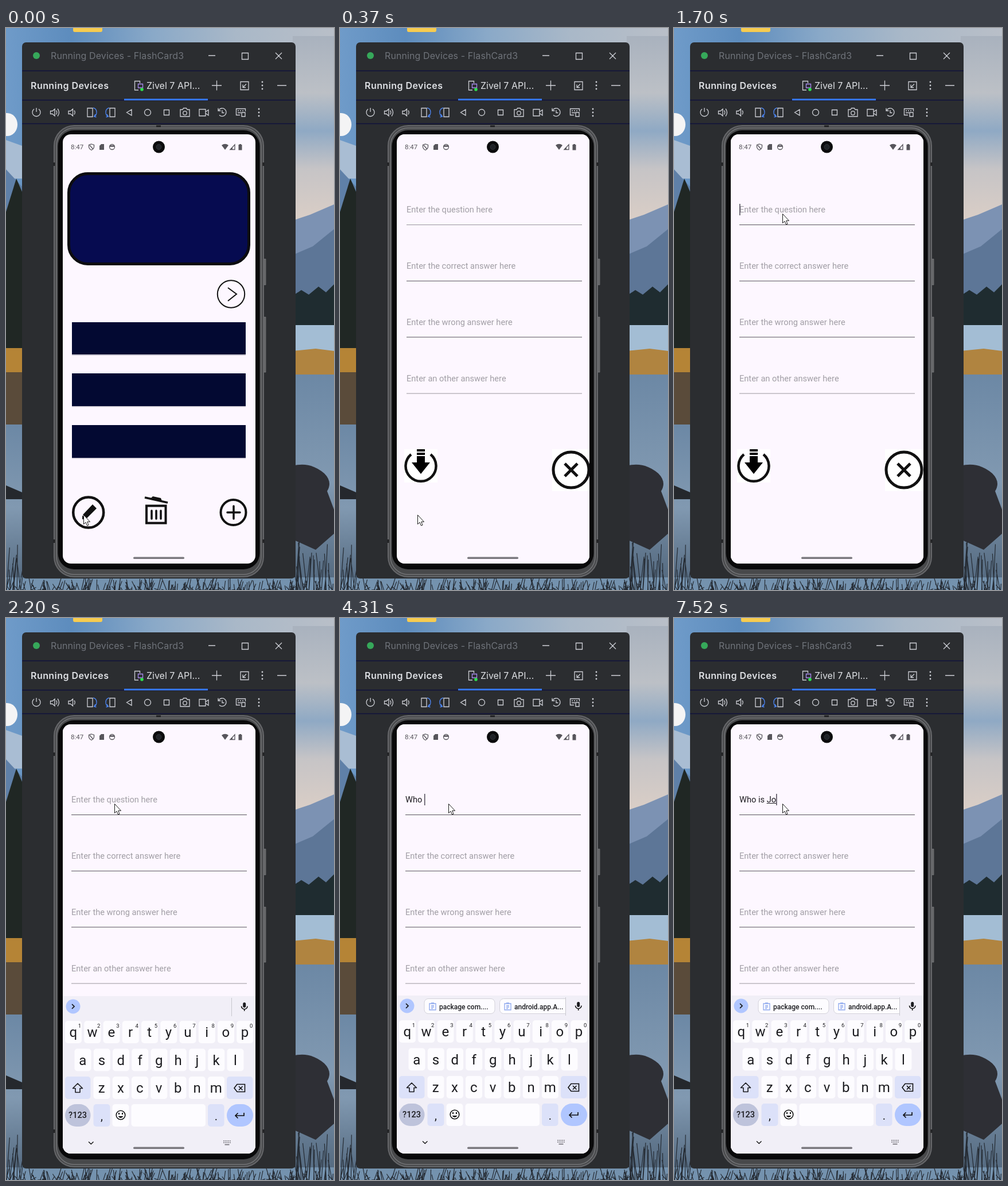
These frames come from a looping animation (572x978 px, 8 s). An HTML page:

```html
<!DOCTYPE html>
<html lang="en">
<head>
<meta charset="utf-8">
<title>Flash card form</title>
<style>
  html, body { margin: 0; height: 100%; overflow: hidden; background: #2b2d30; }
  svg { display: block; width: 100vw; height: 100vh; }
  text { white-space: pre; }
  .ui { font-family: Inter, sans-serif; font-size: 16px; fill: #dfe1e5; }
  .app { font-family: Roboto, sans-serif; }
  .field { font-size: 14.6px; fill: #a19ea5; }
  .line { fill: none; stroke: #ced0d6; stroke-width: 1.3; }
  .ink { fill: none; stroke: #111; }
  .mid { text-anchor: middle; }
</style>
</head>
<body>
<svg viewBox="0 0 572 978" preserveAspectRatio="none">
  <defs>
    <clipPath id="screen"><rect x="99" y="185" width="336" height="747" rx="14"/></clipPath>
    <clipPath id="chips"><rect x="140" y="655" width="253" height="40"/></clipPath>
    <linearGradient id="top">
      <stop offset="0" stop-color="#6f9bc9"/><stop offset=".2" stop-color="#5d8cbd"/>
      <stop offset=".45" stop-color="#8aa9c8"/><stop offset=".7" stop-color="#a9b8c8"/>
      <stop offset="1" stop-color="#b9bfc8"/>
    </linearGradient>
    <linearGradient id="sky" x2="0" y2="1">
      <stop offset="0" stop-color="#a9b2be"/><stop offset=".3" stop-color="#bcc0c6"/>
      <stop offset=".5" stop-color="#8fa9c4"/><stop offset=".7" stop-color="#c6c4c6"/>
      <stop offset="1" stop-color="#dccfc6"/>
    </linearGradient>
    <linearGradient id="water" x2="0" y2="1">
      <stop offset="0" stop-color="#6c88a5"/><stop offset=".5" stop-color="#8199b1"/>
      <stop offset="1" stop-color="#50657b"/>
    </linearGradient>
  </defs>

  <!-- landscape -->
  <rect width="572" height="978" fill="url(#top)"/>
  <g id="right">
    <rect x="500" y="14" width="72" height="330" fill="url(#sky)"/>
    <path d="M500 335L530 325L572 307V470H500Z" fill="#7c92b3"/>
    <path d="M500 395L535 380L572 350V470H500Z" fill="#5d7697"/>
    <path d="M500 466L515 456L528 464L545 450L558 460L572 446V518H500Z" fill="#1f2c30"/>
    <rect x="500" y="517" width="72" height="46" fill="#a3bdd4"/>
    <path d="M500 562L540 558L572 562V604H500Z" fill="#b08440"/>
    <rect x="500" y="603" width="72" height="375" fill="url(#water)"/>
    <path d="M500 762Q530 754 555 775Q570 790 560 806L572 838V880L540 908L500 890Z" fill="#2e2f35"/>
  </g>
  <g id="left">
    <ellipse cx="2" cy="168" rx="18" ry="20" fill="#f4f4f5"/>
    <path d="M0 195L28 205V262H0Z" fill="#a9bdd3"/>
    <path d="M0 246L28 276V350H0Z" fill="#5f80a8"/>
    <path d="M0 320L18 262L28 285V565H0Z" fill="#202724"/>
    <rect y="557" width="28" height="42" fill="#b58436"/>
    <rect y="599" width="28" height="95" fill="#5a4b3a"/>
    <rect y="690" width="28" height="288" fill="url(#water)"/>
    <path d="M0 796L28 808V820H0Z" fill="#25282d"/>
  </g>
  <rect y="956" width="572" height="22" fill="#7492ae"/>
  <path id="reeds" fill="none" stroke="#252b33" stroke-width="1.2"/>
  <path d="M117 0H168V4Q168 7 165 7H120Q117 7 117 4Z" fill="#f6cb50"/>

  <!-- window -->
  <rect x="28" y="25" width="477" height="933" rx="7" fill="#2b2d30"/>
  <path d="M28 74.5H505M28 125.5H505M28 166.5H505" stroke="#10113c" stroke-width="1.6"/>
  <circle cx="53" cy="48" r="6" fill="#36a85a"/>
  <g class="ui">
    <text x="78" y="54" letter-spacing=".1" fill="#6f737a" style="fill:#6f737a">Running Devices - FlashCard3</text>
    <text x="43" y="106" font-weight="600" letter-spacing=".45">Running Devices</text>
    <text x="245" y="106">Zivel 7 API...</text>
  </g>
  <rect x="206" y="123" width="146" height="3" fill="#3574f0"/>
  <g class="line">
    <path d="M353 48H365M411.500 43.500H422.500V54.500H411.500ZM470 43L481 54M481 43L470 54"/>
    <path d="M359 100H376M367.500 91.500V108.500M473 100H489"/>
    <path d="M409 93.500H423V107.500H409ZM419 97.500L413 103.500M413 98.500V103.500H418"/>
    <path d="M231 108H224.500V92.500H233.500V96" />
    <path d="M230.500 97.500H238.500V104H230.500Z" stroke="#a98bf0"/>
    <path d="M49 141A7 7 0 1 0 57 141M53 139V146"/>
    <path id="speaker" d="M77.500 144.500H81L85 141V153L81 149.500H77.500ZM87.500 143.500Q90 147 87.500 150.500"/>
    <path d="M90 140.500Q95 147 90 153.500"/>
    <use href="#speaker" x="31.500"/>
    <g id="turn"><path d="M142 139.500H151V154.500H142Z"/><path d="M152 139Q158 140 158 147Q158 152 154 154M156 150L153.500 154L157.500 155" stroke="#4d85f0"/></g>
    <use href="#turn" transform="matrix(-1 0 0 1 332 0)"/>
    <path d="M210.500 147L219 142V152ZM275.500 142.500H284.500V151.500H275.500Z"/>
    <circle cx="247" cy="147" r="5.500"/>
    <path d="M304 142H308L309.500 139.500H314.500L316 142H320V154H304Z"/><circle cx="312" cy="148" r="3.300"/>
    <path d="M337 141.500H348V153H337ZM348 146L353 142.500V152L348 148.500"/>
    <path d="M371 143A7 7 0 1 1 372 151.500M370 139.500V144H374.500M377 143V147.500H380.500"/>
    <path d="M408 151.500H401.500V140.500H417.500V145M404 144H406M408 144H410M412 144H414M404 147.500H410M411 147H417V154H411Z"/>
  </g>
  <circle cx="237" cy="107" r="2.800" fill="#2ee04c"/>
  <g fill="#ced0d6" id="dots"></g>

  <!-- phone body -->
  <path d="M450 402H453V447H450ZM450 503H453V599H450Z" fill="#606163" stroke="#8a8b8d" stroke-width=".6"/>
  <rect x="84" y="170" width="365" height="785" rx="35" fill="#48494b" stroke="#66676a" stroke-width="2"/>
  <rect x="88" y="174" width="357" height="777" rx="31" fill="none" stroke="#737477" stroke-width="1.500"/>
  <rect x="90.500" y="178" width="352" height="764" rx="28" fill="#09090a"/>
  <path d="M262 171H270M84 234V240M84 890V896M449 234V240M449 890V896" stroke="#222325" stroke-width="3"/>

  <g clip-path="url(#screen)" class="app">
    <rect x="99" y="185" width="336" height="747" fill="#fdf7ff"/>

    <g id="home">
      <rect x="109.500" y="253.500" width="314" height="157" rx="33" fill="#060b50" stroke="#0c0c10" stroke-width="5"/>
      <circle cx="392.500" cy="463" r="23.700" class="ink" stroke-width="2"/>
      <path d="M387 452L402 463L387 475" class="ink" stroke-width="2"/>
      <path d="M115 569H418M115 658.500H418M115 748.500H418" stroke="#c9c5cf" stroke-width="2"/>
      <path d="M115 512H418V568H115ZM115 601H418V658H115ZM115 691H418V748H115Z" fill="#030932"/>
      <circle cx="143.700" cy="843" r="26.500" class="ink" stroke-width="4.500"/>
      <path d="M134 847L151 829L158 836L141 853ZM133 848L139 854L133 855Z" fill="#111"/>
      <path d="M242 817L282 826" class="ink" stroke-width="3.500"/>
      <path d="M253 818L256 815L270 818L272 823Z" fill="#111"/>
      <path d="M245 831.500H278.500V861.500H245Z" class="ink" stroke-width="4"/>
      <path d="M254 840V854M262 840V854M270 840V854" class="ink" stroke-width="3.500" stroke-linecap="round"/>
      <circle cx="396.500" cy="843" r="22" class="ink" stroke-width="4"/>
      <path d="M386 843H408M397 832V854" class="ink" stroke-width="3.500" stroke-linecap="round"/>
    </g>

    <g id="form">
      <rect x="99" y="185" width="350" height="747" fill="#fdf7ff"/>
      <g class="field">
        <text id="hint" x="114" y="321">Enter the question here</text>
        <text x="114" y="419">Enter the correct answer here</text>
        <text x="114" y="517">Enter the wrong answer here</text>
        <text x="114" y="615">Enter an other answer here</text>
        <text id="typed" x="114" y="321" style="fill:#1d1b20"></text>
      </g>
      <path id="focusLine" d="M114 342.500H420"/>
      <path d="M114 440.300H420M114 538H420" stroke="#57555b" stroke-width="1.100"/>
      <path d="M114 636H420" stroke="#99969c"/>
      <rect id="under" y="322" height="1" fill="#1d1b20"/>
      <rect id="caret" y="306" width="1.600" height="20" fill="#57525f"/>
      <path d="M110 733H168V791H110ZM368 733H440V806H368Z" fill="#fff"/>
      <path d="M122 742A26.500 26.500 0 1 0 156 742" class="ink" stroke="#000" stroke-width="4.500"/>
      <path d="M132 733H146V737H132ZM132 739H146V743H132ZM132 745H146V756H155L139 776L123 756H132Z"/>
      <circle cx="401" cy="769" r="31" class="ink" stroke-width="5"/>
      <path d="M390 758L412 780M412 758L390 780" class="ink" stroke-width="5"/>
    </g>

    <g id="board">
      <rect x="99" y="657" width="336" height="290" fill="#f1eff7"/>
      <circle cx="117" cy="675" r="12.500" fill="#b0c6ff"/>
      <path d="M115 671L119 675L115 679" class="ink" stroke-width="1.700"/>
      <path d="M393.500 660V692" stroke="#c8c7ce"/>
      <rect x="413.200" y="668" width="5" height="9" rx="2.500" fill="#1b1b1f"/>
      <path d="M410.500 674.500A5.200 5.200 0 0 0 421 674.500M415.700 680V683" class="ink" stroke-width="1.600"/>
      <g id="clips" clip-path="url(#chips)" font-size="12" font-weight="500" fill="#1b1b1f">
        <rect x="147" y="662.500" width="123" height="26" rx="7" fill="#fdfcff" stroke="#d3d2da"/>
        <rect x="278.500" y="662.500" width="130" height="26" rx="7" fill="#fdfcff" stroke="#d3d2da"/>
        <g id="clip" fill="none" stroke="#8fa9ee" stroke-width="1.300">
          <path d="M156 671H167V682H156ZM159 674.500H164M159 677H164M159 679.500H162M159 670H164"/>
        </g>
        <use href="#clip" x="131"/>
        <text x="173" y="681">package com....</text>
        <text x="304" y="681">android.app.A...</text>
      </g>
      <g id="keys"></g>
      <path id="shift" d="M125 809L133.500 817.500H129V824.500H121V817.500H116.500Z" stroke="#1b1b1f" stroke-width="1.600" stroke-linejoin="round"/>
      <path d="M403 810.500H416.500V823.500H403L398 817ZM406 814L412.500 820.500M412.500 814L406 820.500" class="ink" stroke-width="1.600"/>
      <circle cx="200" cy="864" r="7.800" class="ink" stroke-width="1.600"/>
      <path d="M195.500 866Q200 872 204.500 866Z"/><path d="M197 860V863M203 860V863" class="ink" stroke-width="2"/>
      <path d="M415 860V865H400M404.500 860.500L400 865L404.500 869.500" class="ink" stroke-width="1.700"/>
      <path d="M144 910.500L148.300 914.500L152.500 910.500" class="ink" stroke-width="1.300"/>
      <path d="M379 909H392M379 912H392" stroke="#66646b" stroke-width="1.500" stroke-dasharray="1.600 1.200"/>
      <path d="M381.500 915.500H389.500" stroke="#66646b" stroke-width="1.300"/>
    </g>

    <!-- status bar -->
    <text x="113" y="211" font-size="11.500" fill="#57555b">8:47</text>
    <g fill="none" stroke="#57555b" stroke-width="1.300">
      <path d="M149 202L153.500 203.500V207Q153 210.500 149 212.500Q145 210.500 144.500 207V203.500ZM146 204L152 211"/>
      <circle cx="185" cy="207" r="4.500"/><path d="M181 205.500H189" stroke-width="2.500"/>
      <path d="M391 211.500H399V203Z"/>
    </g>
    <path d="M166 202H171V212H163V205ZM376 204Q382 199.500 388 204L382 212ZM395 207V212H390ZM405.500 203H407V202H410V203H411.500V212.500H405.500Z" fill="#57555b"/>
    <circle cx="266.500" cy="207" r="10.500" fill="#0b0b0c"/>
    <circle cx="266.500" cy="207" r="4.500" fill="#1f2226" stroke="#303338"/>
    <rect x="222" y="920.500" width="89" height="3.500" rx="1.700" fill="#7a787e"/>
  </g>

  <path id="mouse" d="M.500 .500V16.500L4 13.200L6.500 19L9 18L6.700 12.300H11.500Z" fill="#fff" stroke="#1a1a1a"/>
</svg>
<script>
const $ = id => document.getElementById(id);
const set = (id, attrs) => { for (const k in attrs) $(id).setAttribute(k, attrs[k]); };
const show = (id, on) => set(id, { visibility: on ? 'visible' : 'hidden' });
const at = (steps, t) => steps.findLast(s => s[0] <= t);

// Each step: start time, then values
const mouse = [[0, 135, 847], [490, 135, 775], [610, 135, 626], [750, 143, 514],
  [1030, 156, 448], [1150, 175, 372], [1270, 189, 323]];
const slide = [[0, 12], [370, 2], [490, 1], [610, 0]];
const rise = [[0, 45], [2200, 1], [2320, 0]];
const typing = [[0, ''], [3250, 'W'], [3500, 'Wh'], [3750, 'Who'], [4030, 'Who '], [4460, 'Who i'],
  [4580, 'Who is'], [5080, 'Who is '], [5750, 'Who is J'], [7260, 'Who is Jo']];
const marked = [[0, 0, 0], [3250, 0, 1], [3750, 0, 3], [4310, 0, 0], [4460, 4, 5], [4830, 4, 6],
  [5200, 0, 0], [5750, 7, 8], [7520, 7, 9]];
const blink = [[0, 0], [1580, 1], [2080, 0], [2690, 1], [6140, 0], [6700, 1]];

const ctx = document.createElement('canvas').getContext('2d');
const width = s => { ctx.font = '14.6px Roboto, sans-serif'; return ctx.measureText(s).width; };

function buildKeys() {
  const key = (x, y, w, fill = '#fdfcff', r = 5) =>
    `<rect x="${x}" y="${y}" width="${w}" height="39" rx="${r}" fill="${fill}"/>`;
  const label = (x, y, s, size, more = '') =>
    `<text class="mid" x="${x}" y="${y}" font-size="${size}" fill="#1b1b1f" ${more}>${s}</text>`;
  let out = '';
  [['qwertyuiop', 103, 700], ['asdfghjkl', 119.500, 748.500], ['zxcvbnm', 152.500, 797]].forEach(([row, x0, y], r) =>
    [...row].forEach((c, i) => {
      const x = x0 + i * 33.250;
      out += key(x, y, 29) + label(x + 14.300, y + 28, c, 24, 'data-letter="1"');
      if (!r) out += label(x + 25.500, y + 11.500, (i + 1) % 10, 9.500);
    }));
  const pale = '#dce1f9';
  out += key(103, 797, 44.500, pale) + key(385, 797, 45.500, pale)
    + key(103, 845, 44.500, '#bec3db', 19.500) + label(125, 869, '?123', 14.500, 'font-weight="500"')
    + key(152.500, 845, 29, pale) + label(167, 873, ',', 20)
    + key(185.500, 845, 29) + key(218.500, 845, 129.500)
    + key(352, 845, 28.500, pale) + label(366.300, 873, '.', 20)
    + key(385, 845, 46, '#b0c6ff', 19.500);
  $('keys').innerHTML = out;
}

function buildDetails() {
  let dots = '', reeds = '', seed = 7;
  const rnd = () => (seed = seed * 16807 % 2147483647) / 2147483647;
  for (const [x, y] of [[447, 100], [441, 147]])
    for (const d of [-6, 0, 6]) dots += `<circle cx="${x}" cy="${y + d}" r="1.400"/>`;
  $('dots').innerHTML = dots;
  for (let i = 0; i < 260; i++) {
    const x = rnd() * 572, edge = x < 28 || x > 505;
    reeds += `M${x} 978l${rnd() * 16 - 8} ${-rnd() * (edge ? 85 : 22)}`;
  }
  set('reeds', { d: reeds });
}

buildKeys();
buildDetails();
const letters = [...document.querySelectorAll('[data-letter]')].map(el => [el, el.textContent]);
let wasUpper = false;

function draw(t) {
  const [, mx, my] = at(mouse, t);
  set('mouse', { transform: `translate(${mx} ${my})` });

  const entering = t >= 250 && t < 370;
  show('home', t < 370);
  set('home', { transform: `translate(${entering ? -20 : 0} 0)` });
  show('form', t >= 250);
  set('form', { transform: `translate(${at(slide, t)[1]} 0)`, opacity: entering ? .66 : 1 });

  const text = at(typing, t)[1], [, from, to] = at(marked, t), left = width(text.slice(0, from));
  $('typed').textContent = text;
  set('hint', { opacity: text ? 0 : 1 });
  set('under', { x: 114 + left, width: width(text.slice(0, to)) - left });
  set('caret', { x: 114 + width(text), opacity: at(blink, t)[1] });
  set('focusLine', { stroke: t < 1580 ? '#99969c' : '#57555b' });

  show('board', t >= 2080);
  show('clips', t >= 2320);
  set('board', { transform: `translate(0 ${at(rise, t)[1]})` });
  const upper = t >= 5600 && t < 5750;
  if (upper !== wasUpper) {
    letters.forEach(([el, c]) => el.textContent = upper ? c.toUpperCase() : c);
    wasUpper = upper;
  }
  set('shift', { fill: upper ? '#1b1b1f' : 'none' });
}

const start = performance.now();
function frame() {
  draw((performance.now() - start) % 8000);
  requestAnimationFrame(frame);
}
frame();
</script>
</body>
</html>
```
